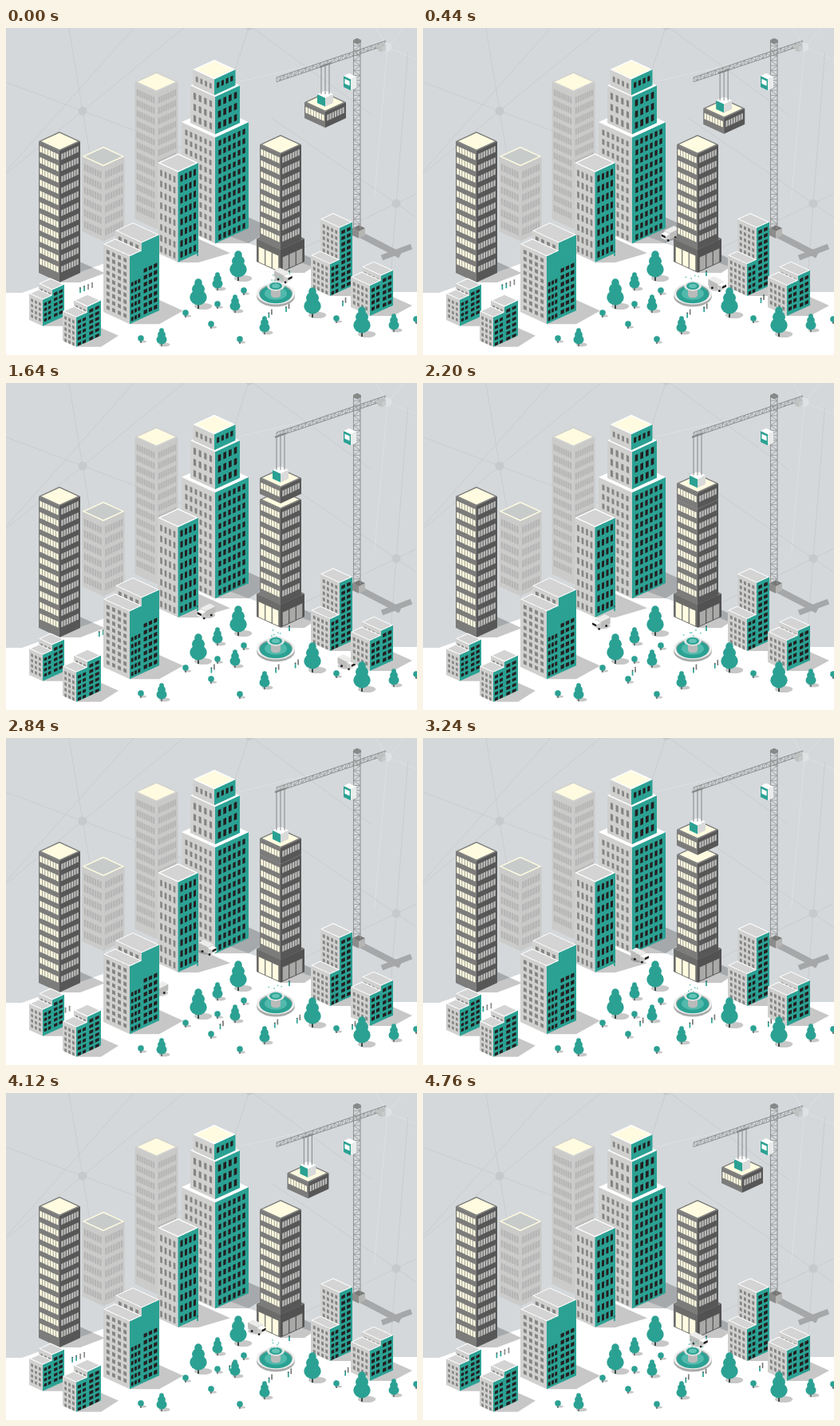
An HTML page with a canvas that plays this animation: 515x410 px, repeating every 4.8 s.

```html
<!DOCTYPE html>
<html lang="en">
<head>
<meta charset="utf-8">
<title>City under construction</title>
<style>
html, body { margin: 0; width: 100%; height: 100%; overflow: hidden; background: #d4d8db; }
canvas { display: block; }
</style>
</head>
<body>
<canvas id="stage" width="515" height="410"></canvas>
<script>
const ctx = document.getElementById('stage').getContext('2d');
const LOOP = 4800, TAU = Math.PI * 2, SLOPE = .46;
const TEAL = '#2ba193', INK = '#231f20', PALE = '#d0d0cf', ROOF = '#d3d4d3', GRAY = '#858584';
const CREAM = '#fffbe0', SHADE = 'rgba(0,0,0,.22)';

const clamp = v => Math.max(0, Math.min(1, v));
const ease = (t, from, to) => (1 - Math.cos(Math.PI * clamp((t - from) / (to - from)))) / 2;
const swing = t => -Math.cos(TAU * t / LOOP);

function poly(fill, pts) {
  ctx.beginPath();
  for (let i = 0; i < pts.length; i += 2) ctx.lineTo(pts[i], pts[i + 1]);
  ctx.closePath();
  ctx.fillStyle = fill;
  ctx.fill();
}

function line(color, width, x1, y1, x2, y2) {
  ctx.strokeStyle = color;
  ctx.lineWidth = width;
  ctx.beginPath();
  ctx.moveTo(x1, y1);
  ctx.lineTo(x2, y2);
  ctx.stroke();
}

function oval(fill, x, y, rx, ry = rx) {
  ctx.fillStyle = fill;
  ctx.beginPath();
  ctx.ellipse(x, y, rx, ry, 0, 0, TAU);
  ctx.fill();
}

const grid = (color, cols, step, high, more) =>
  ({ color, cols, step, high, wide: .55, top: 5, edge: .07, ...more });

// A skewed wall hanging from its upper left corner, with an even window grid.
function wall(x, y, dx, dy, h, fill, win) {
  ctx.save();
  ctx.transform(dx, dy, 0, 1, x, y);
  ctx.fillStyle = fill;
  ctx.fillRect(0, 0, 1, h);
  if (win) {
    const cell = (1 - 2 * win.edge) / win.cols;
    ctx.fillStyle = win.color;
    for (let v = win.top; v + win.high <= h; v += win.step)
      for (let c = 0; c < win.cols; c++)
        ctx.fillRect(win.edge + (c + (1 - win.wide) / 2) * cell, v, cell * win.wide, win.high);
  }
  ctx.restore();
}

// Isometric box from its left roof corner; a and b are the left and right wall widths.
function box(x, y, a, b, h, look, k = SLOPE) {
  const { left, right, winL, winR, rim, roof, inset = 0 } = look;
  const top = n => [x + 2 * n, y, x + b, y - b * k + n, x + a + b - 2 * n, y + (a - b) * k, x + a, y + a * k - n];
  wall(x, y, a, a * k, h, left, winL);
  wall(x + a, y + a * k, b, -b * k, h, right, winR);
  poly(rim || roof, top(0));
  if (inset) poly(roof, top(inset));
}

const tower = (x, y, r, h, look) => box(x - r, y, r, r, h, look);

// Shadow to the right of a box, from its front bottom corner.
const shadow = (x, y, w, reach) => poly(SHADE, [x, y, x + w, y - (w + reach) * .45, x + w + reach, y - w * .45, x + w, y]);

const plain = (left, right, roof) => ({ left, right, roof });
const office = {
  left: '#7c7c7b', right: '#575757', rim: '#777776', roof: CREAM, inset: 1.5,
  winL: grid(CREAM, 7, 14.1, 7.5, { wide: .8, edge: .04 }),
  winR: grid('#bcbcbb', 7, 14.1, 7.5, { wide: .72 })
};
const haze = (rim, roof, step, cols) => {
  const win = grid('#b5b5b5', cols, step, step * .6, { wide: .72, top: 8 });
  return { left: '#cbcbca', right: '#c9c9c8', rim, roof, inset: 1.6, winL: win, winR: win };
};
const civic = (cols, step, roof = ROOF) => ({
  left: PALE, right: TEAL, rim: '#fff', roof, inset: 1.6,
  winL: grid(GRAY, cols, step, step * .58, { wide: .48, top: 7 }),
  winR: grid(INK, cols, step, step * .58, { top: 6 })
});
const flat = (colsL, colsR, step, blank = 5) => ({
  left: PALE, right: TEAL, rim: '#fff', roof: ROOF, inset: 1.1,
  winL: grid(GRAY, colsL, step, step * .56),
  winR: grid(INK, colsR, step, step * .56, { wide: .68, top: blank })
});
const lobby = {
  left: '#6c6c6b', right: '#525252', roof: '#777776',
  winL: grid(CREAM, 3, 30, 19, { wide: .86, top: 9 }),
  winR: grid('#a9a9a8', 3, 30, 17, { wide: .86, top: 11 })
};

// A low block in front of a raised one, both sharing the left wall width a.
function stepped(x, y, a, low, high, rise, h, reach, look) {
  shadow(x + a, y + a * SLOPE + h, low + high, reach);
  box(x + low, y - low * SLOPE - rise, a, high, h + rise, look);
  box(x, y, a, low, h, look);
}

function hub(x, y, color, rays, turn) {
  oval(color, x, y, 5.5);
  for (let i = 0; i < rays; i++) {
    const a = turn + i * TAU / rays;
    line(color, .8, x, y, x + Math.cos(a) * 190, y + Math.sin(a) * 190);
  }
}

function backdrop() {
  ctx.fillStyle = '#d4d8db';
  ctx.fillRect(0, 0, 515, 410);
  hub(478, 24, '#dfe2e4', 5, .4);
  hub(96, 104, '#c7cacc', 6, .36);
  hub(489, 220, '#c7cacc', 6, .6);
  hub(305, -3, '#c7cacc', 5, .63);
  line('#c7cacc', .8, 0, 180, 160, 0);
  poly('#fff', [0, 332, 20, 332, 250, 250, 470, 331, 515, 331, 515, 410, 0, 410]);
  line('#a5a7a8', 8, 440, 257, 494, 285);
  line('#a5a7a8', 7, 471, 288, 508, 274);
}

// Truss of two rails joined by rungs and diagonals.
function lattice(x1, y1, x2, y2, gx, gy, count) {
  const dx = (x2 - x1) / count, dy = (y2 - y1) / count, color = '#929494';
  line(color, 1.1, x1, y1, x2, y2);
  line(color, 1.1, x1 + gx, y1 + gy, x2 + gx, y2 + gy);
  for (let i = 0; i < count; i++) {
    const x = x1 + dx * i, y = y1 + dy * i, s = i % 2;
    line(color, .8, x, y, x + gx, y + gy);
    line(color, .8, x + gx * s, y + gy * s, x + dx + gx * (1 - s), y + dy + gy * (1 - s));
  }
}

function crane() {
  tower(442, 251, 8, 9, plain('#8c8c8b', '#b5b5b4', '#777776'));
  lattice(435.5, 16, 435.5, 252, 8.5, 0, 38);
  lattice(339, 62, 476, 16, 0, 5.5, 30);
  tower(440, 15, 5, 3, plain('#858786', '#858786', '#858786'));
  tower(471, 21, 5, 7, plain('#bfc1c1', '#c9cbcb', '#bfc1c1'));
  box(423, 60, 9, 7, 14, { ...plain(TEAL, '#e9eceb', '#fff'), winL: grid('#fff', 1, 20, 6, { wide: .8, top: 3 }) });
}

function load(t) {
  const out = t < LOOP / 2;
  const away = out ? ease(t, 0, 1000) : 1 - ease(t, 3450, 4620);
  const down = out ? ease(t, 1000, 2280) : 1 - ease(t, 2790, 3430);
  const x = 400 - 56 * away, hook = 47 + 19 * away, y = hook + 46 + 14 * down;
  tower(x, y, 26, 20, office);
  tower(x, y - 10, 10, 11, plain(TEAL, '#d9dad9', '#fff'));
  for (const d of [-5, 0, 5]) line('#8d8f8f', 1.1, x + d, hook - d * .34, x + d, y - 10);
  line('#858786', 2, x - 7, hook + 2, x + 7, hook - 3);
}

function truck(x, y, side) {
  ctx.save();
  ctx.translate(x, y);
  ctx.scale(side, 1);
  oval(SHADE, 0, 5, 11, 4);
  box(-11, -6, 12, 7, 8, plain('#bdbdbc', '#d5d5d4', '#ececeb'), .5);
  box(1, 1, 5, 6, 5, { ...plain('#c9c9c8', '#f4f4f3', '#fff'), winR: grid(INK, 1, 9, 3, { wide: 1, top: 0 }) }, .5);
  oval(INK, -6, 5, 1.5);
  oval(INK, 3, 9, 1.4);
  ctx.restore();
}

function truckEast(t) {
  const x = 347 + .0485 * (t < LOOP / 2 ? t : t - LOOP);
  ctx.save();
  ctx.beginPath();
  ctx.rect(241, 0, 200, 410);
  ctx.clip();
  truck(x, 310 + (x - 347) / 2, 1);
  ctx.restore();
}

function truckWest(t) {
  if (t < 3800) truck(332 - .0492 * t, 247 + .0238 * t, -1);
}

function tree(x, base, s) {
  oval(SHADE, x + 6 * s, base - 1, 11 * s, 4 * s);
  line('#3c4a48', 2 * s, x, base - 6 * s, x, base + 2 * s);
  oval(TEAL, x, base - 12 * s, 10.5 * s, 9.5 * s);
  oval(TEAL, x, base - 22 * s, 7.8 * s, 7.5 * s);
  oval(TEAL, x, base - 30 * s, 4.7 * s, 5 * s);
}

function bush(x, base) {
  oval(SHADE, x + 2.5, base, 4.5, 1.6);
  line('#3c4a48', 1.2, x, base - 3, x, base + 2);
  oval(TEAL, x, base - 4, 3.8, 3.8);
}

function garden() {
  for (const [x, y] of [[298, 333], [225, 361], [265, 350], [257, 375], [169, 393], [293, 394], [414, 368], [514, 369]]) bush(x, y);
  for (const [x, y] of [[265, 328], [287, 356], [324, 383], [195, 398], [486, 380]]) tree(x, y, .62);
  for (const [x, y] of [[291, 315], [241, 350], [384, 361], [446, 385]]) tree(x, y, 1.02);
}

function fountain(t) {
  const bowl = (y, r, ...colors) => colors.forEach((c, i) => oval(c, 338, y, r - i * 3, (r - i * 3) * .56));
  bowl(336, 24, '#a9abaa');
  bowl(333, 24, '#ecefee', '#8fa5a1');
  bowl(334, 20, TEAL);
  bowl(333, 14, '#52b9ac');
  ctx.fillStyle = '#b9bbba';
  ctx.fillRect(332, 325, 12, 10);
  bowl(335, 6, '#b9bbba');
  bowl(323.5, 11, '#e4e7e6', TEAL, '#62c3b6');
  for (let i = 0; i < 6; i++) {
    const p = (t / 800 + i * .37) % 1, a = i * TAU / 6;
    oval('#6cc6ba', 338 + Math.cos(a) * 13 * p, 320 + Math.sin(a) * 4 * p - 34 * p * (1 - p), .9);
  }
}

function person(x, y, color) {
  line(color, 1.7, x, y - 2.2, x, y + 3);
  oval(color === TEAL ? '#3f5b58' : '#777776', x, y - 3, 1);
}

function pair(x, y) {
  person(x - 1, y + 1, TEAL);
  person(x + 2.5, y - 3, '#777776');
}

function walkers(t) {
  pair(335 + 5 * swing(t + 300), 359.5);
  pair(359.5 + 7.5 * swing(t), 353 + swing(t));
  const stroll = t - 400, climb = (t + LOOP - 2300) % LOOP;
  if (stroll > 0 && stroll < 3900) pair(247 + .0092 * stroll, 341 + 22 * Math.sin(Math.PI * stroll / 3900));
  if (climb < 3800) pair(429 + 6 * Math.cos(TAU * (climb - 540) / 3900), 366.5 - .0087 * climb);
}

function leftWalkers(t) {
  const run = t < LOOP / 2 ? t : t - LOOP;
  for (let i = 0; i < 4; i++) {
    const x = 93 + .0145 * run + i * 5;
    if (x > 73 && x < 122) person(x, 329 - .0085 * run - i * 2, i < 2 ? TEAL : '#8b8b8a');
  }
}

function draw(t) {
  backdrop();
  tower(122, 161, 26.5, 94, haze(CREAM, '#c7cbca', 14.3, 7));
  tower(188.5, 67.5, 27, 172, haze(PALE, CREAM, 13.2, 8));
  shadow(67, 319, 26, 31);
  tower(67, 142, 26, 165, office);
  leftWalkers(t);
  shadow(262, 270, 42, 30);
  tower(262, 118, 42, 133, civic(6, 11.8, '#fff'));
  tower(262, 72, 31, 47, civic(4, 14, '#fff'));
  tower(261, 52, 26.5, 20, civic(4, 11.5, CREAM));
  shadow(215, 294, 26, 40);
  tower(215.5, 169, 25.5, 113, civic(4, 13.6));
  person(240, 283, TEAL);
  truckWest(t);
  shadow(344, 307, 30, 20);
  tower(344, 264, 30, 29, lobby);
  tower(344, 146, 26, 120, office);
  crane();
  load(t);
  person(355, 308, TEAL);
  truckEast(t);
  stepped(122, 271, 33, 15, 22, 10, 85, 30, flat(4, 3, 8.7, 34));
  stepped(29, 333, 17, 12, 15, 7, 33, 11, flat(3, 2, 6.6));
  stepped(71, 355, 17, 14, 17, 7, 37, 22, flat(3, 2, 7));
  walkers(t);
  stepped(382, 285, 24, 12, 16, 40, 40, 18, flat(4, 2, 7.6));
  stepped(432, 312, 24, 14, 15, 6, 38, 24, flat(4, 2, 7.8));
  garden();
  fountain(t);
}

function frame() {
  draw(performance.now() % LOOP);
  requestAnimationFrame(frame);
}
frame();
</script>
</body>
</html>
```
